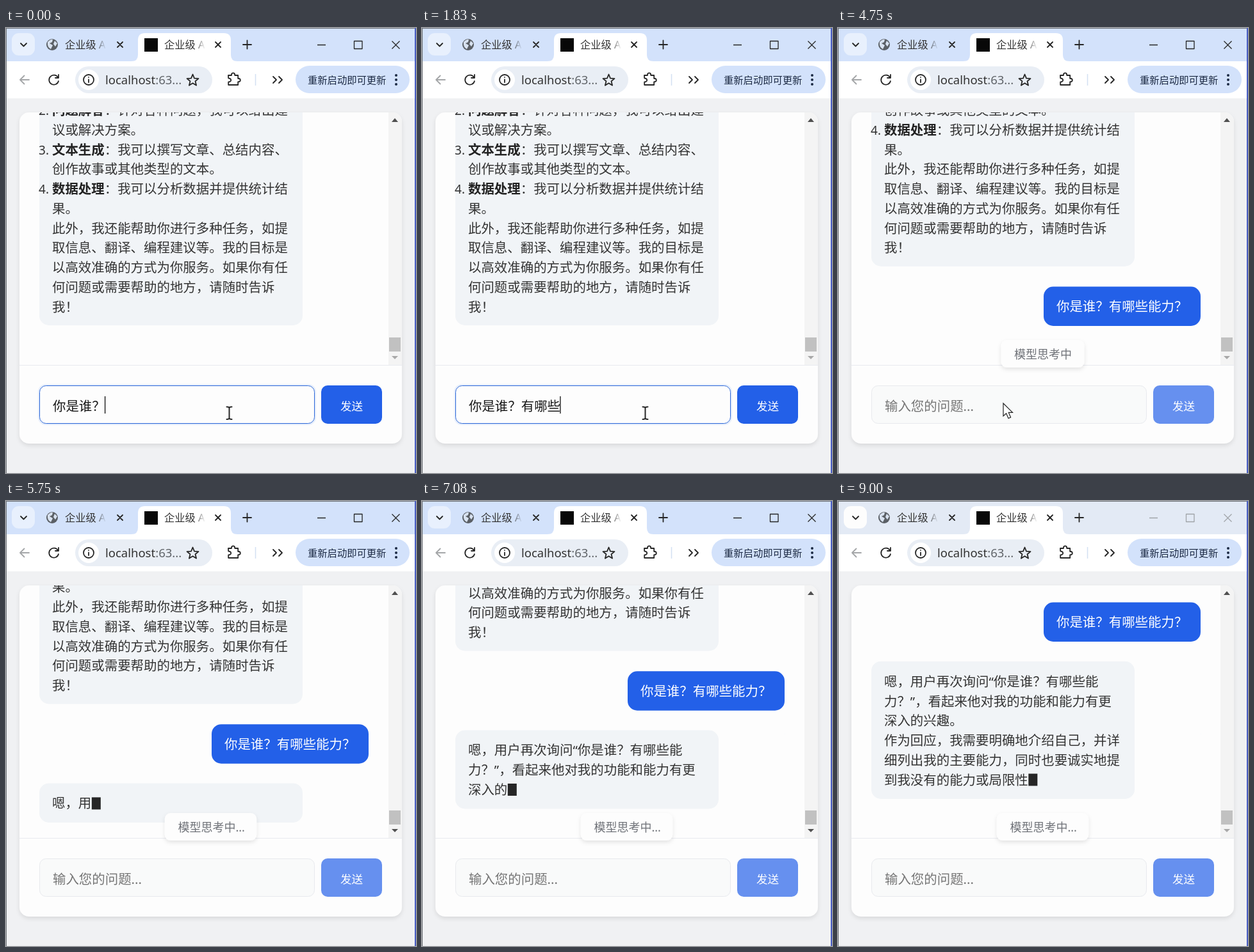
Recreate the animation shown at these times as an HTML page. Size 640 by 696 pixels, loop 9.08 s.

```html
<!DOCTYPE html>
<html lang="zh-CN">
<head>
<meta charset="utf-8">
<title>Chat</title>
<style>
  html, body { margin: 0; width: 100%; height: 100%; overflow: hidden; background: #f0f1f3; }
  svg { display: block; width: 640px; height: 696px; }
  text {
    font: 20.45px 'Noto Sans', 'Noto Sans CJK SC', sans-serif;
    text-spacing-trim: space-all; white-space: pre; fill: #333;
  }
  .bold { font-weight: 700; fill: #222; }
  .tab { font-size: 16.3px; }
  .line { fill: none; stroke: #262626; stroke-width: 1.8; stroke-linecap: round; stroke-linejoin: round; }
  .thin { stroke-width: 1.3; stroke-linecap: butt; }
  .bubble { fill: #f1f4f7; }
  .white { fill: #fff; }
  .composing { text-decoration: underline dashed 1px; }
</style>
</head>
<body>
<svg viewBox="0 0 640 696">
  <defs>
    <clipPath id="cardClip"><rect x="21" y="132" width="597" height="518" rx="15"/></clipPath>
    <clipPath id="chatClip"><rect x="21" y="132" width="576" height="395"/></clipPath>
    <linearGradient id="tabFade" gradientUnits="userSpaceOnUse" x1="0" x2="66" y1="0" y2="0">
      <stop offset=".72" stop-color="#333"/><stop offset=".97" stop-color="#333" stop-opacity="0"/>
    </linearGradient>
    <filter id="shadow" x="-10%" y="-30%" width="120%" height="170%">
      <feDropShadow dx="0" dy="3" stdDeviation="3" flood-color="#000" flood-opacity=".1"/>
    </filter>
  </defs>

  <!-- Tab strip -->
  <rect id="strip" width="640" height="60" fill="#d3e2fb"/>
  <rect id="tabMenu" x="9" y="8" width="36" height="35" rx="11" fill="#e8f0fd"/>
  <path class="line" stroke-width="2" d="M23 24l4.500 4.500 4.500-4.500"/>
  <path class="white" d="M196 52q10 0 10-10V19q0-11 11-11h123q11 0 11 11v23q0 10 10 10z"/>
  <circle cx="72" cy="26" r="9" fill="#5b6066"/>
  <path d="M65 22q5-5 8-4l-1 4-4 2 5 3-3 6q-6-3-5-11zM76 20l4 4-3 5-3-4z" fill="#d8e2f0"/>
  <rect x="216" y="16" width="21" height="21" fill="#080808"/>
  <g transform="translate(92 32)"><text class="tab" style="fill:url(#tabFade)">企业级 AI</text></g>
  <g transform="translate(247 32)"><text class="tab" style="fill:url(#tabFade)">企业级 AI</text></g>
  <path class="line" d="M174 22l8 8m0-8l-8 8M327 22l8 8m0-8l-8 8M370 26h13M376.500 19.500v13"/>
  <path id="controls" class="line thin" d="M486 26.500h13M543.500 20.500h12.500v12h-12.500zM602.500 20.500l12 12m0-12l-12 12"/>

  <!-- Toolbar -->
  <rect class="white" y="52" width="640" height="58"/>
  <path class="line" style="stroke:#a4a6a8" d="M36 81H22m6.500-6.500L22 81l6.500 6.500"/>
  <path class="line" d="M81 77a7.500 7.500 0 1 0 1 6M82 73v5h-5"/>
  <rect x="108" y="60" width="214" height="42" rx="21" fill="#e9eef5"/>
  <circle class="white" cx="129" cy="81" r="16"/>
  <circle class="line" cx="129" cy="81" r="8"/>
  <path class="line" d="M129 80.500v4.500M129 77v.1"/>
  <text x="155" y="88" style="font-size:18.500px">localhost<tspan fill="#5f6368">:63...</tspan></text>
  <path id="star" class="line"/>
  <path class="line" d="M347 74h5v-1a2.600 2.600 0 0 1 5.200 0v1h5v5h1a2.600 2.600 0 0 1 0 5.200h-1V89h-15v-4.500q4-.5 4-3t-4-3z"/>
  <path d="M389.500 72v18" stroke="#d3e0f2" stroke-width="1.500"/>
  <path class="line" d="M417 76l5 5-5 5M426 76l5 5-5 5"/>
  <rect x="452" y="59" width="178" height="43" rx="21.500" fill="#d3e2fb"/>
  <text x="471" y="87" style="font-size:15.300px;fill:#1c2a44">重新启动即可更新</text>
  <g fill="#1c2a44"><circle cx="609" cy="74" r="2"/><circle cx="609" cy="81" r="2"/><circle cx="609" cy="88" r="2"/></g>

  <!-- Chat card -->
  <rect y="110" width="640" height="586" fill="#f0f1f3"/>
  <rect x="21" y="132" width="597" height="518" rx="15" fill="#fdfdfd" filter="url(#shadow)"/>
  <g clip-path="url(#chatClip)">
    <g id="chat">
      <rect class="bubble" x="52" y="0" width="411" height="465" rx="15"/>
      <g id="history"></g>
      <g id="question">
        <rect x="321" y="496.750" width="245" height="61.500" rx="15" fill="#2360e8"/>
        <text x="341" y="535.500" style="fill:#fff">你是谁？有哪些能力？</text>
      </g>
      <g id="reply">
        <rect id="replyBox" class="bubble" x="52" y="589" width="411" rx="15"/>
        <g id="replyLines"></g>
        <rect id="block" width="14" height="19" fill="#262626"/>
      </g>
    </g>
  </g>
  <g clip-path="url(#cardClip)">
    <rect x="597" y="132" width="21" height="395" fill="#f4f4f4"/>
    <rect x="598" y="484" width="18" height="22" fill="#c1c1c1"/>
    <path d="M602 147l5-6 5 6z" fill="#505050"/>
    <path id="downArrow" d="M602 513l5 5 5-5z"/>
  </g>
  <path d="M21 527.500h597" stroke="#e8eaf0"/>
  <g id="badge">
    <rect id="badgeBox" y="488" height="43" rx="9" fill="#fdfdfd" filter="url(#shadow)"/>
    <text id="badgeText" y="517" style="font-size:18px;fill:#6f7278"></text>
  </g>

  <!-- Input row -->
  <rect id="glow" x="51" y="558" width="432" height="62" rx="11" fill="none" stroke="#e6eefb" stroke-width="2"/>
  <rect id="field" x="52.500" y="559.500" width="429" height="59" rx="10"/>
  <text id="fieldText" x="73" y="598.500"><tspan id="typed"></tspan><tspan id="composition" class="composing"></tspan></text>
  <rect id="caret" y="576" width="1.300" height="27" fill="#111"/>
  <rect id="send" x="492" y="559" width="95" height="60" rx="10"/>
  <text x="539.500" y="597.500" text-anchor="middle" style="font-size:17.600px;fill:#fff">发送</text>

  <!-- Input method candidates -->
  <g id="candidates">
    <rect x="0" y="626" width="520" height="41" rx="7" fill="#fbfbfb" stroke="#d8d8d8" filter="url(#shadow)"/>
    <rect x="6" y="638" width="3" height="17" rx="1.500" fill="#2360c8"/>
    <text id="candidateText" x="16" y="653" style="font-size:19px"></text>
  </g>

  <path id="beam" class="line" style="stroke-width:2" d="M344.500 592.500q4 0 4 2 0-2 4-2M348.500 594v16M344.500 612q4 0 4-2 0 2 4 2"/>
  <path id="arrow" d="M0 0v20l4.600-4.200 3.400 7.700 3.600-1.600-3.300-7.500h6.200z" fill="#fff" stroke="#222" stroke-width="1.200"/>
  <path d="M0 .5h640M.5 0v696" stroke="#6f7378"/>
  <path d="M639 0v696" stroke="#4a5fc4" stroke-width="2"/>
</svg>
<script>
const LOOP = 9080, STEP = 1000 / 12;
const LINE = 30.75, BLOCK = 3 * LINE;
const SENT = 3500, REPLY = 5580;

const $ = id => document.getElementById(id);
const set = (id, attrs) => Object.entries(attrs).forEach(([k, v]) => $(id).setAttribute(k, v));
const show = (id, on) => { $(id).style.display = on ? '' : 'none'; };
const write = (id, value) => { $(id).textContent = value; };
const clamp = p => Math.max(0, Math.min(1, p));
const smooth = p => (p = clamp(p)) * p * (3 - 2 * p);
const latest = (list, t) => list.filter(entry => entry[0] <= t).pop();

// List items are written as "number|bold label|rest".
const history = [
  '2.|问题解答|：针对各种问题，我可以给出建', '议或解决方案。',
  '3.|文本生成|：我可以撰写文章、总结内容、', '创作故事或其他类型的文本。',
  '4.|数据处理|：我可以分析数据并提供统计结', '果。',
  '此外，我还能帮助你进行多种任务，如提', '取信息、翻译、编程建议等。我的目标是',
  '以高效准确的方式为你服务。如果你有任', '何问题或需要帮助的地方，请随时告诉', '我！'
];
$('history').innerHTML = history.map((line, i) => {
  const y = 136.1 + i * LINE, [number, label, rest] = line.split('|');
  return label
    ? `<text x="67" y="${y}" text-anchor="end" style="font-size:19px">${number}</text>
       <text x="72" y="${y}"><tspan class="bold">${label}</tspan>${rest}</text>`
    : `<text x="72" y="${y}">${line}</text>`;
}).join('');

const reply = [
  '嗯，用户再次询问“你是谁？有哪些能', '力？”，看起来他对我的功能和能力有更', '深入的兴趣。',
  '作为回应，我需要明确地介绍自己，并详', '细列出我的主要能力，同时也要诚实地提', '到我没有的能力或局限性'
];
const replyText = reply.join('');
// Number of streamed characters at which each line opens.
const lineOpens = [0, 19, 36, 42, 59, 77];
const CHAR_RATE = .0262, STREAM = 5620;
$('replyLines').innerHTML = reply.map((_, i) => `<text x="72" y="${628 + i * LINE}"></text>`).join('');
const replyRows = [...$('replyLines').children];

// Time, committed text, pinyin being composed.
const typing = [
  [0, '你是谁？', ''], [80, '你是谁？', 'y'], [160, '你是谁？', 'yo'], [250, '你是谁？', 'you'],
  [660, '你是谁？', "you'n"], [830, '你是谁？', "you'na"], [1080, '你是谁？', "you'na'x"],
  [1160, '你是谁？', "you'na'xi"], [1330, '你是谁？', "you'na'xie"], [1580, '你是谁？有哪些', ''],
  [2330, '你是谁？有哪些', 'n'], [2410, '你是谁？有哪些', 'ne'], [2500, '你是谁？有哪些', 'nen'],
  [2580, '你是谁？有哪些', 'neng'], [2660, '你是谁？有哪些', "neng'l"], [2750, '你是谁？有哪些', "neng'li"],
  [3000, '你是谁？有哪些能力', ''], [3160, '你是谁？有哪些能力？', '']
];
const candidateList = [
  [0, '有 又 由 右 游 优 油'], [660, '有哪些 有那些 有哪 有那 有'],
  [2330, '能 你 呢 那 嗯 年 内'], [2660, '能力 能量 能 嫩 能立']
];
const pointer = [[0, 344, 599], [4250, 344, 599], [4750, 258, 587], [5166, 586, 94], [5250, 604, 67]];

$('star').setAttribute('d', 'M' + Array.from({ length: 10 }, (_, i) => {
  const a = i * Math.PI / 5, r = i % 2 ? 4.2 : 9.5;
  return [291.5 + r * Math.sin(a), 82 - r * Math.cos(a)].map(v => v.toFixed(1));
}).join('L') + 'z');

function drawField(t) {
  const sent = t >= SENT, [, text, pinyin] = latest(typing, t);
  write('typed', sent ? '输入您的问题...' : text);
  write('composition', sent ? '' : pinyin);
  $('fieldText').style.fill = sent ? '#757575' : '#181818';
  set('field', { fill: sent ? '#f9fafa' : '#fdfdfd', stroke: sent ? '#e8eaee' : '#2a66d8' });
  set('send', { fill: sent ? '#6690ef' : '#2360e8' });
  show('glow', !sent);
  show('caret', !sent);
  if (!sent) set('caret', { x: 72.2 + $('fieldText').getComputedTextLength() });
  const composing = !sent && pinyin !== '';
  show('candidates', composing);
  if (composing) {
    const words = latest(candidateList, t)[1].split(' ');
    write('candidateText', words.map((word, i) => `${i + 1} ${word}`).join('   '));
    set('candidates', { transform: `translate(${text.length > 4 ? 212 : 147} 0)` });
  }
}

function drawChat(t) {
  const count = Math.max(0, Math.floor((t - STREAM) * CHAR_RATE));
  const open = Math.max(1, lineOpens.filter(n => n <= count).length);
  let scroll = BLOCK * (smooth((t - SENT) / 330) + smooth((t - REPLY) / 300));
  for (const n of lineOpens.slice(1)) scroll += LINE * clamp((t - STREAM - n / CHAR_RATE) / 180);
  const bottom = t < SENT ? 0 : t < REPLY ? BLOCK : 2 * BLOCK + (open - 1) * LINE;
  set('chat', { transform: `translate(0 ${-scroll})` });
  set('downArrow', { fill: bottom - scroll > 1 ? '#505050' : '#a8a8a8' });
  show('question', t >= SENT);
  show('reply', t >= REPLY);

  let start = 0;
  replyRows.forEach((row, i) => {
    const end = open === 1 ? count : start + reply[i].length;
    row.textContent = i < open ? replyText.slice(start, Math.min(end, count)) : '';
    start = end;
  });
  set('replyBox', { height: 30.75 + open * LINE });
  if (t >= REPLY) {
    set('block', { x: 72.5 + replyRows[open - 1].getComputedTextLength(), y: 611 + (open - 1) * LINE });
  }
}

function drawBadge(t) {
  show('badge', t >= SENT);
  const dots = [0, 2, 3][(Math.floor((t - 4580) / 500) + 12) % 3];
  const width = 130 + dots * 4.4, x = 319.5 - width / 2;
  set('badgeBox', { x, width });
  set('badgeText', { x: x + 20.5 });
  write('badgeText', '模型思考中' + '.'.repeat(dots));
}

function drawPointer(t) {
  show('beam', t < 3330);
  show('arrow', t >= 3330 && t < 5410);
  const from = latest(pointer, t), to = pointer[pointer.indexOf(from) + 1] || from;
  const p = to === from ? 0 : (t - from[0]) / (to[0] - from[0]);
  const [x, y] = [1, 2].map(i => from[i] + (to[i] - from[i]) * p);
  set('arrow', { transform: `translate(${x} ${y})` });
}

function drawWindow(t) {
  const active = t < 8910;
  $('controls').style.stroke = active ? '#262626' : '#a0a4a8';
  set('tabMenu', { fill: active ? '#e8f0fd' : '#fdfdfd' });
  set('strip', { fill: active ? '#d3e2fb' : '#e3eaf5' });
}

function frame(now) {
  const t = Math.floor((now % LOOP + 8) / STEP) * STEP;
  [drawWindow, drawField, drawChat, drawBadge, drawPointer].forEach(draw => draw(t));
  requestAnimationFrame(frame);
}
frame(performance.now());
</script>
</body>
</html>
```
